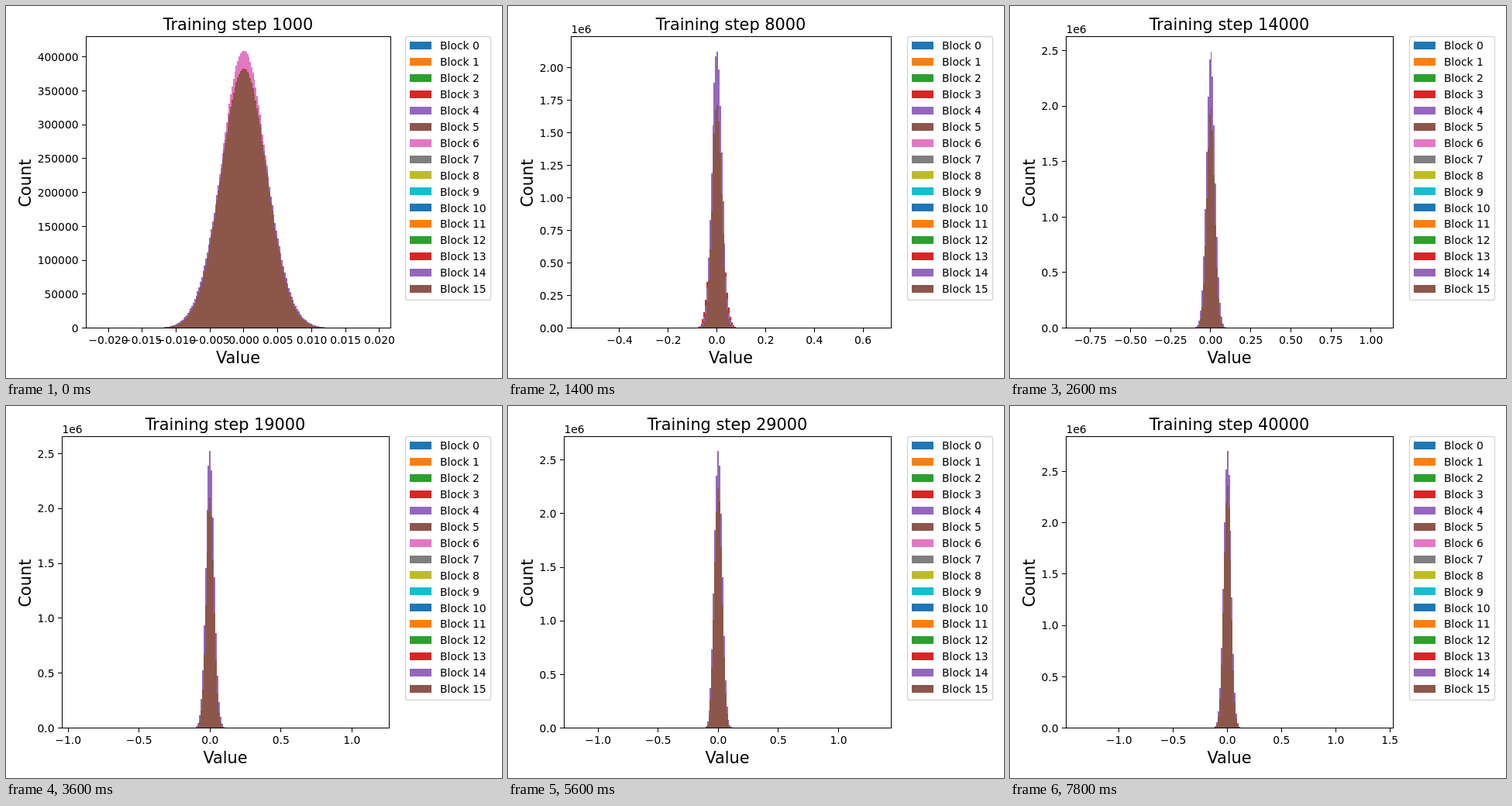
These frames come from a looping animation (640x480 px, 8000 ms). An HTML page with a canvas:

```html
<!DOCTYPE html>
<html lang="en">
<head>
<meta charset="utf-8">
<title>Training histogram</title>
<style>
html, body { margin: 0; width: 100%; height: 100%; overflow: hidden; background: #fff; }
canvas { display: block; }
</style>
</head>
<body>
<canvas id="stage" width="640" height="480"></canvas>
<script>
const ctx = document.getElementById('stage').getContext('2d');
const COLORS = ['#1f77b4', '#ff7f0e', '#2ca02c', '#d62728', '#9467bd',
                '#8c564b', '#e377c2', '#7f7f7f', '#bcbd22', '#17becf'];
const [RED, PURPLE, BROWN, PINK] = [3, 4, 5, 6].map(i => COLORS[i]);
const TOP = 39.5, BOTTOM = 415.5, BINS = 200;
const STEP_MS = 200, STEPS = 40, SCALED = 5;
const SMALL = 13.89, LARGE = 20.83;

// step, -x min, x max, y max (millions), sigma, then relative [height, width]
// of the pink, red, purple and brown layers
const KEYS = [
  [1,  .02326, .02166, .430,  .00337, 1, .97, .935, 1.01, .925, 1.025, .933, .99],
  [5,  .293,   .321,   1.378, .0148,  0, 1,   1,    1,    .84,  1.1,   .93,  .96],
  [8,  .599,   .716,   2.238, .0205,  0, 1,   .76,  1.12, 1,    1,     .805, .95],
  [14, .902,   1.139,  2.626, .0266,  0, 1,   .6,   1,    1,    1,     .8,   .92],
  [25, 1.186,  1.387,  2.680, .0317,  0, 1,   .6,   1,    1,    1,     .861, .95],
  [33, 1.370,  1.485,  2.754, .0325,  0, 1,   .6,   1,    1,    1,     .873, .955],
  [40, 1.488,  1.531,  2.840, .0343,  0, 1,   .6,   1,    1,    1,     .874, .96]
];

function stateAt(step) {
  const i = Math.max(1, KEYS.findIndex(k => k[0] >= step));
  const a = KEYS[i - 1], b = KEYS[i];
  const u = Math.log(step / a[0]) / Math.log(b[0] / a[0]);
  return a.map((v, n) => n < SCALED ? v * (b[n] / v) ** u : v + (b[n] - v) * u);
}

// Smallest round interval that gives at most nine divisions
function ticksFor(min, max) {
  const raw = (max - min) / 9, e = Math.floor(Math.log10(raw));
  const m = [1, 2, 2.5, 5, 10].find(v => v * 10 ** e >= raw * (1 - 1e-9));
  const size = m * 10 ** e, values = [];
  for (let k = Math.ceil(min / size); k <= max / size; k++) values.push(k * size);
  return { values, digits: Math.max(0, -e + (m === 2.5) - (m === 10)) };
}

function text(str, x, y, size = SMALL, align = 'center') {
  ctx.font = `${size}px "DejaVu Sans", sans-serif`;
  ctx.textAlign = align;
  ctx.fillStyle = '#000';
  ctx.fillText(str, x, y);
}

function rect(color, x0, y0, x1, y1) {
  ctx.fillStyle = color;
  ctx.fillRect(x0, y0, x1 - x0, y1 - y0);
}

function drawLegend(x) {
  ctx.strokeStyle = '#d6d6d6';
  ctx.lineWidth = 1.39;
  ctx.beginPath();
  ctx.roundRect(x, 39.5, 110, 340, 2.8);
  ctx.stroke();
  for (let i = 0; i < 16; i++) {
    const y = 51 + i * 20.93, top = Math.round(y - 5), left = Math.round(x + 5.4);
    rect(COLORS[i % 10], left, top, left + 28, top + 10);
    text('Block ' + i, x + 44.6, y + 5.2, SMALL, 'left');
  }
}

function drawBars(color, height, width, s) {
  const { left, right, xMin, xMax, sigma } = s;
  const margin = (right - left) / 22, bar = (right - left - 2 * margin) / BINS;
  const unit = (right - left) / (xMax - xMin), zero = left - xMin * unit;
  for (let i = 0; i < BINS; i++) {
    const x = left + margin + i * bar;
    const z = (x + bar / 2 - zero) / (unit * sigma * width);
    const h = height * (BOTTOM - TOP) / 1.05 * Math.exp(-z * z / 2);
    if (h > .4) rect(color, Math.round(x), Math.round(BOTTOM - h), Math.round(x + bar), 416);
  }
}

function drawAxes(s, yTicks, millions) {
  const { left, right, xMin, xMax, yMax } = s;
  ctx.strokeStyle = '#000';
  ctx.lineWidth = 1;
  ctx.strokeRect(left, TOP, right - left, BOTTOM - TOP);

  const xTicks = ticksFor(xMin, xMax);
  for (const v of xTicks.values) {
    const x = left + (v - xMin) / (xMax - xMin) * (right - left);
    rect('#000', Math.floor(x), 416, Math.floor(x) + 1, 421);
    text(v.toFixed(xTicks.digits).replace('-', '\u2212'), x, 436);
  }
  for (const v of yTicks.values) {
    const y = BOTTOM - v / yMax * (BOTTOM - TOP);
    rect('#000', left - 5.5, Math.floor(y), left - .5, Math.floor(y) + 1);
    text(millions ? v.toFixed(yTicks.digits) : (v * 1e6).toFixed(0), left - 9.9, y + 5.2, SMALL, 'right');
  }
  if (millions) text('1e6', left, 35, SMALL, 'left');
}

function draw(step) {
  const [, low, xMax, yMax, sigma, ...layers] = stateAt(step);
  const yTicks = ticksFor(0, yMax), millions = yMax >= 1;
  const wide = millions && yTicks.digits < 2, early = wide && step < 8;
  const left = !millions ? 103.5 : wide ? 72.5 : 81.5;
  const right = !millions ? 496.5 : early ? 495.5 : 494.5;
  const s = { left, right, xMin: -low, xMax, yMax, sigma };

  rect('#fff', 0, 0, 640, 480);
  [PINK, RED, PURPLE, BROWN].forEach((color, i) =>
    drawBars(color, layers[2 * i], layers[2 * i + 1], s));
  drawAxes(s, yTicks, millions);

  const middle = (left + right) / 2;
  text(`Training step ${step * 1000}`, middle - .5, 31, LARGE);
  text('Value', middle - .5, 461, LARGE);
  ctx.save();
  ctx.translate(31.5, 228.5);
  ctx.rotate(-Math.PI / 2);
  text('Count', 0, 0, LARGE);
  ctx.restore();
  drawLegend(early ? 517 : 515.5);
}

let shown = 0;
function tick() {
  const step = Math.floor(performance.now() / STEP_MS) % STEPS + 1;
  if (step !== shown) draw(shown = step);
  requestAnimationFrame(tick);
}
tick();
</script>
</body>
</html>
```
